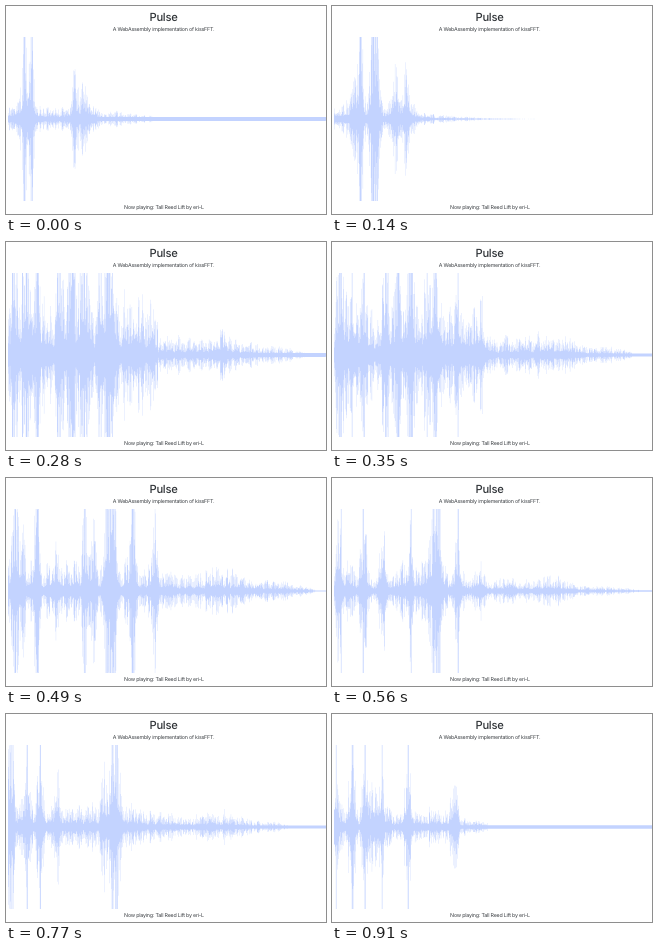
Animation, 320 px wide and 208 px high, one loop 980 ms. Source, as an HTML page with a canvas:

```html
<!DOCTYPE html>
<html lang="en">
<head>
<meta charset="utf-8">
<title>Pulse</title>
<style>
  html, body { margin: 0; width: 100%; height: 100%; overflow: hidden; background: #fff; }
  canvas, svg { position: absolute; inset: 0; width: 100%; height: 100%; display: block; }
  text {
    font: 400 5.3px Inter, "Liberation Sans", sans-serif;
    letter-spacing: -.2px;
    text-anchor: middle;
    text-rendering: geometricPrecision;
    fill: #3b3f43;
  }
  .title { font-size: 11.2px; font-weight: 500; letter-spacing: -.25px; fill: #303438; }
</style>
</head>
<body>
<canvas width="320" height="208"></canvas>
<svg viewBox="0 0 320 208">
  <text class="title" x="157.5" y="14.5">Pulse</text>
  <text x="157.5" y="24.5">A WebAssembly implementation of kissFFT.</text>
  <text x="158" y="202.8">Now playing: Tall Reed Lift by eri-L</text>
</svg>
<script>
const ctx = document.querySelector('canvas').getContext('2d');
const STEP = 70, STEPS = 14, MID = 113, MAX = 82, LEFT = 2, BINS = 1024, BIN = 320 / BINS;

// loud: end of the loud band, quiet: end of the decay after it (shaped by bend).
// bursts: x of full-scale hits, swells: x of hits half as strong.
const poses = [
  { step: 0, loud: 95, high: 13, quiet: 165, low: 9, bend: 1, tail: 1.9, rise: 80, bursts: [18, 25], swells: [69, 78] },
  { step: 2, loud: 83, high: 14, quiet: 267, low: 8, bend: 4, tail: 0, rise: 80, bursts: [29, 41, 45], swells: [22, 63, 74] },
  { step: 4, loud: 152, high: 52, quiet: 300, low: 18, bend: .5, tail: 1.9, rise: 110, bursts: [8, 20, 32, 54, 66, 78, 95, 103], swells: [] },
  { step: 7, loud: 152, high: 24, quiet: 310, low: 18, bend: .5, tail: .4, rise: 90, bursts: [9, 31, 79, 101, 104, 107, 126], swells: [17, 51, 88, 148] },
  { step: 9, loud: 111, high: 9, quiet: 280, low: 11, bend: 1.3, tail: 1.2, rise: 75, bursts: [6, 33, 51, 102, 107], swells: [69, 96] },
  { step: 11, loud: 135, high: 20, quiet: 285, low: 13, bend: .5, tail: 1.5, rise: 75, bursts: [5, 21, 34, 106, 111], swells: [52, 98] },
  { step: 13, loud: 127, high: 16, quiet: 160, low: 8, bend: .4, tail: 1.7, rise: 65, bursts: [4, 20, 33, 50, 76], swells: [41, 122] },
];

function random(seed) {
  let s = seed;
  return () => {
    s = s + 0x6D2B79F5 | 0;
    let t = Math.imul(s ^ s >>> 15, 1 | s);
    t = t + Math.imul(t ^ t >>> 7, 61 | t) ^ t;
    return ((t ^ t >>> 14) >>> 0) / 4294967296;
  };
}

const mix = (a, b, k) => a + (b - a) * k;
const bell = (x, center, width) => Math.exp(-(((x - center) / width) ** 2));
const hits = (x, list) => list.reduce((sum, c) => sum + bell(x, c, 3.2), 0);

function envelope(p, x) {
  const left = Math.max(0, Math.min(1, (p.quiet - x) / (p.quiet - p.loud)));
  const decay = p.low * left ** p.bend * (1 + .6 * bell(x, 218, 18));
  const floor = x < p.loud ? p.high : decay;
  return floor + p.rise * (hits(x, p.bursts) + hits(x, p.swells) / 2);
}

function draw(step) {
  const a = poses.findLast(p => p.step <= step);
  const b = poses.find(p => p.step >= step);
  const k = a === b ? 0 : (step - a.step) / (b.step - a.step);
  const near = k > .5 ? b : a;
  const tail = mix(a.tail, b.tail, k);
  const rnd = random(step * 977 + 41);
  const lumps = Array.from({ length: 170 }, () => .55 + .75 * rnd());

  ctx.clearRect(0, 0, 320, 208);
  ctx.fillStyle = '#c3d3ff';
  ctx.beginPath();
  for (let x = LEFT; x < 320; x += BIN) {
    const i = Math.floor(x / 2);
    const lump = mix(lumps[i], lumps[i + 1], x / 2 - i);
    const level = mix(envelope(a, x), envelope(b, x), k) * lump * (.22 + .85 * rnd() ** 1.7);
    const peak = near.bursts.some(c => Math.abs(x - c) < .4);
    const h = peak ? MAX : Math.min(MAX, Math.max(tail, level));
    ctx.rect(x, MID - h, BIN, 2 * h);
  }
  ctx.fill();
}

const start = performance.now();
let shown = -1;
function tick() {
  const step = Math.floor((performance.now() - start) / STEP) % STEPS;
  if (step !== shown) draw(shown = step);
  requestAnimationFrame(tick);
}
tick();
</script>
</body>
</html>
```
